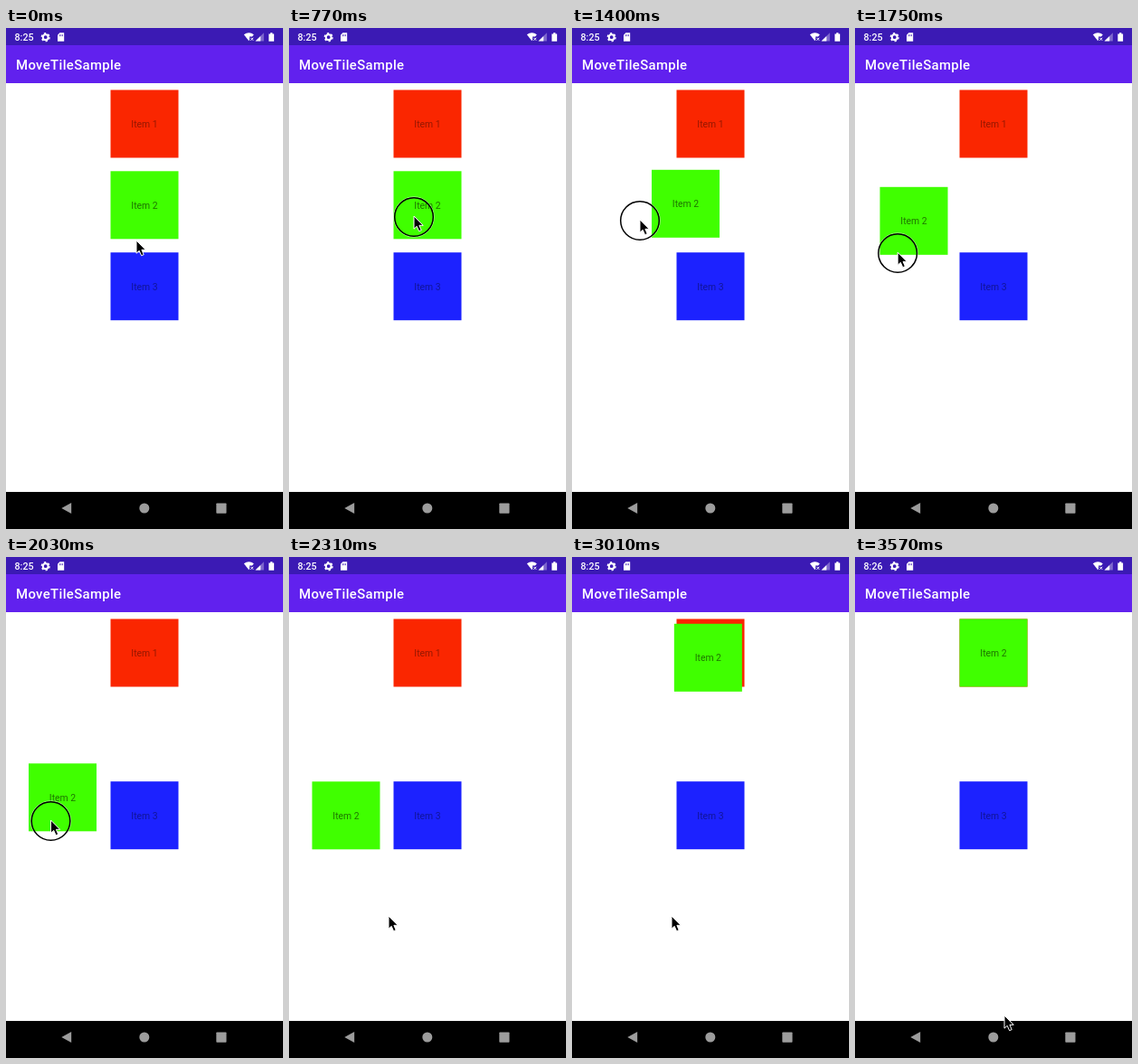
An HTML page for the animation above (3.64 s loop, 306 by 554 pixels).

```html
<!DOCTYPE html>
<html lang="en">
<head>
<meta charset="utf-8">
<title>Drag tiles</title>
<style>
  html, body { margin: 0; width: 100%; height: 100%; overflow: hidden; background: #fff; }
  svg { display: block; width: 306px; height: 554px; font-family: Roboto, sans-serif; }
  .tile text { font-size: 10.4px; text-anchor: middle; }
</style>
</head>
<body>
<svg viewBox="0 0 306 554">
  <rect width="306" height="554" fill="#fff"/>

  <rect y="18" width="306" height="43" fill="#6121ee"/>
  <rect width="306" height="19" fill="#3b1ab4"/>
  <text x="11" y="46" font-size="14.9" font-weight="500" letter-spacing=".35" fill="#fff">MoveTileSample</text>

  <g fill="#fff">
    <text id="clock" x="9.5" y="14" font-size="10.7" font-weight="500">8:25</text>
    <g fill="none" stroke="#fff">
      <circle cx="43.7" cy="10.2" r="2.9" stroke-width="2"/>
      <circle cx="43.7" cy="10.2" r="4.3" stroke-width="1.6" stroke-dasharray="2.2 2.303"/>
    </g>
    <path d="M59.4 5.3H64.2V14.8H57V7.7Z"/>
    <path d="M59.5 7.2v2M61 7.2v2M62.5 7.2v2" stroke="#3b1ab4" stroke-width=".7"/>
    <path d="M262.8 7.3Q268.3 3.3 273.8 7.3L272 9.6H269V13.3L268.3 14.2Z"/>
    <path d="M270.2 10.8L273.2 13.8M273.2 10.8L270.2 13.8" stroke="#fff" stroke-width="1"/>
    <path d="M284.8 5.3V14.6H275.5Z" opacity=".35"/>
    <path d="M281.2 8.9V14.6H275.5Z"/>
    <path d="M290.3 6.4H292V5.3H294.4V6.4H296.1V14.8H290.3Z"/>
  </g>

  <g class="tile" transform="translate(115.5 68.5)">
    <rect width="75" height="75" fill="#fa2600"/>
    <text x="37.5" y="41.5" fill="#000" fill-opacity=".4">Item 1</text>
  </g>
  <g class="tile" id="green">
    <rect width="75" height="75" fill="#40ff00"/>
    <text x="37.5" y="41.5" fill="#000" fill-opacity=".54">Item 2</text>
  </g>
  <g class="tile" transform="translate(115.5 248.2)">
    <rect width="75" height="75" fill="#1c22ff"/>
    <text x="37.5" y="41.5" fill="#000" fill-opacity=".4">Item 3</text>
  </g>

  <rect y="513" width="306" height="41" fill="#000"/>
  <g fill="#9c9c9c">
    <path d="M61.3 531L72.2 525V537Z"/>
    <circle cx="152.8" cy="531" r="5.5"/>
    <rect x="232.3" y="525.5" width="11.2" height="11.2" rx=".8"/>
  </g>

  <g id="pointer">
    <g id="press" fill="none">
      <circle cy="1" r="22.3" stroke="#fff" stroke-opacity=".5" stroke-width="1"/>
      <circle cy="1" r="21.3" stroke="#000" stroke-width="1.5"/>
    </g>
    <path d="M0 0V14.2L3.2 11.3L5.6 16.7L8.2 15.6L5.9 10.3H10.2Z" fill="#000" stroke="#fff" stroke-width="1" stroke-linejoin="round"/>
  </g>
</svg>
<script>
  const LOOP = 3640, STEP = 70, LAG = 140;
  const HOME = [115.5, 158.3], SLOT = [115.5, 68.5], GRAB = [138, 208];
  const SETTLE = 2565, SETTLE_TIME = 500;

  // Rows are [ms, x, y].
  const drag = [
    [980, 138, 208], [1120, 130, 206.5], [1260, 110.5, 206.5], [1400, 75, 212],
    [1540, 53, 218], [1680, 47, 233], [1890, 47.5, 278], [2030, 49.5, 291], [2100, 48, 298]
  ];
  const path = [
    [0, 144, 235], [70, 143, 229], [280, 138, 208], ...drag,
    [2170, 63, 325], [2240, 93, 372], [2310, 110, 397], [3150, 110, 397],
    [3290, 125, 430], [3360, 125, 430], [3430, 138, 458], [3500, 155, 490], [3570, 165, 507]
  ];

  const mix = (a, b, k) => [a[0] + (b[0] - a[0]) * k, a[1] + (b[1] - a[1]) * k];

  function along(rows, t) {
    const i = rows.findIndex(r => r[0] > t);
    if (i < 0) return rows.at(-1).slice(1);
    if (i === 0) return rows[0].slice(1);
    const a = rows[i - 1], b = rows[i];
    return mix(a.slice(1), b.slice(1), (t - a[0]) / (b[0] - a[0]));
  }

  function greenAt(t) {
    const [x, y] = along(drag, t - LAG);
    const held = [HOME[0] + x - GRAB[0], HOME[1] + y - GRAB[1]];
    const u = Math.min(1, Math.max(0, (t - SETTLE) / SETTLE_TIME));
    return mix(held, SLOT, (1 - Math.cos(Math.PI * u)) / 2);
  }

  const el = id => document.getElementById(id);
  const green = el('green'), pointer = el('pointer'), press = el('press'), clock = el('clock');
  const place = (node, [x, y]) => node.setAttribute('transform', `translate(${x} ${y})`);

  function draw(now) {
    const t = Math.floor((now % LOOP) / STEP) * STEP;
    place(green, greenAt(t));
    place(pointer, along(path, t));
    press.style.display = t >= 770 && t < 2170 ? '' : 'none';
    clock.textContent = t < 3430 ? '8:25' : '8:26';
  }

  const start = performance.now();
  function tick() {
    draw(performance.now() - start);
    requestAnimationFrame(tick);
  }
  tick();
</script>
</body>
</html>
```
